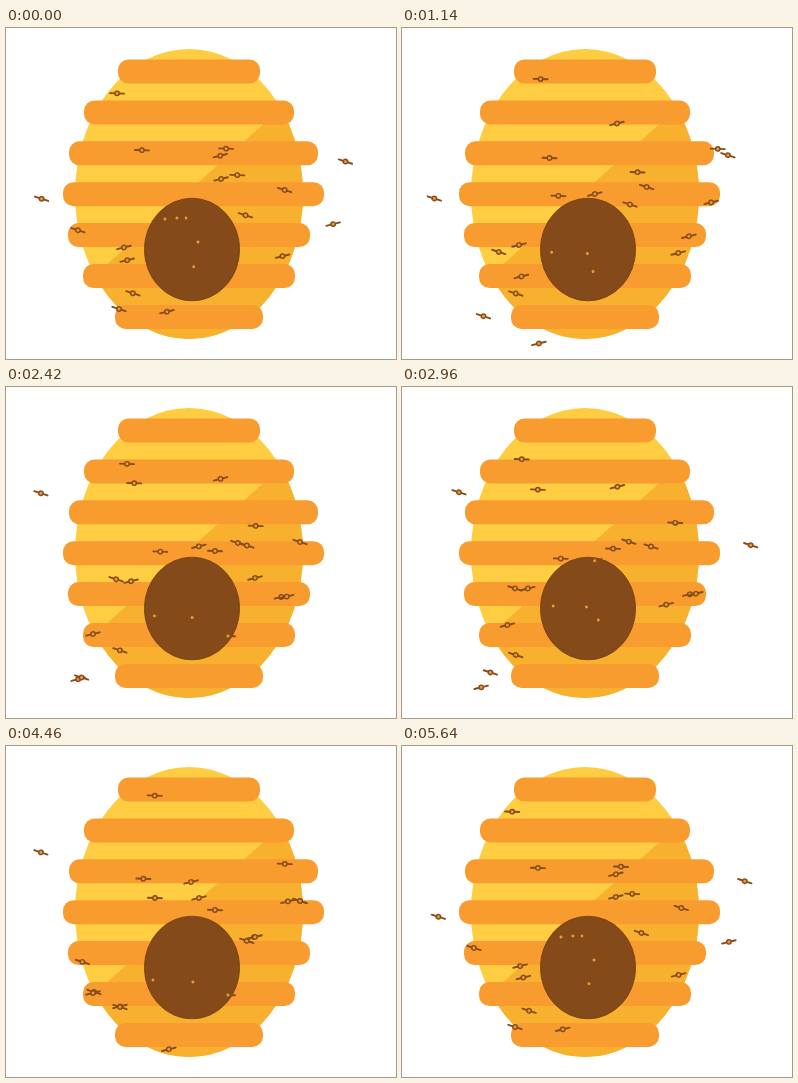
Recreate the animation shown at these times as an HTML page. Size 390 by 331 pixels, loop 5660 ms.

```html
<!DOCTYPE html>
<html lang="en">
<head>
<meta charset="utf-8">
<title>Beehive</title>
<style>
  html, body { margin: 0; width: 100%; height: 100%; overflow: hidden; background: #fff; }
  svg { display: block; width: 100vw; height: 100vh; }
</style>
</head>
<body>
<svg viewBox="0 0 390 331">
  <defs>
    <clipPath id="dome"><ellipse cx="183" cy="166" rx="114" ry="145"/></clipPath>
    <g id="bee">
      <path d="M-7 0H7" stroke="#864b18" stroke-width="1.9" stroke-linecap="round"/>
      <circle r="2.2" fill="#e59a3c" stroke="#864b18" stroke-width="1.4"/>
    </g>
  </defs>
  <g clip-path="url(#dome)">
    <path d="M0 0H390V331H0Z" fill="#ffcd42"/>
    <path d="M282 74L60 273V331H390V74Z" fill="#f8b02f"/>
  </g>
  <g id="bands" fill="#f89c30"></g>
  <ellipse cx="186" cy="221.5" rx="47.6" ry="51.3" fill="#844a1a" stroke="#77410f" stroke-width=".8"/>
  <g id="bees"></g>
</svg>
<script>
const NS = 'http://www.w3.org/2000/svg';
const LOOP = 5660;
const LEG = 880;
const TILTS = [-14, 2, 18];

function add(parent, tag, attributes) {
  const node = document.createElementNS(NS, tag);
  for (const key in attributes) node.setAttribute(key, attributes[key]);
  return document.getElementById(parent).appendChild(node);
}

// Left and right edge of each band, top to bottom.
[[112, 254], [78, 288], [63, 312], [57, 318], [62, 304], [77, 289], [109, 257]]
  .forEach(([left, right], row) => add('bands', 'rect', {
    x: left, y: 31.5 + row * 40.9, width: right - left, height: 24, rx: 10.5
  }));

// Each bee flies its waypoints out and back; a flock shares its turning time.
const flocks = [
  { turn: 2550, lag: 80, routes: [
    [72, 292, 107, 320, 161, 305, 160, 282],
    [249, 139, 330, 126, 284, 118, 215, 121],
    [232, 156, 217, 157, 240, 194, 239, 186],
    [275, 210, 317, 194, 287, 157, 209, 151],
    [121, 77, 121, 58, 150, 49, 107, 67],
    [110, 192, 115, 225, 78, 217, 72, 201],
    [125, 194, 126, 227, 114, 261, 122, 229],
    [128, 96, 154, 122, 138, 133, 136, 121]
  ] },
  { turn: 4570, lag: 200, routes: [
    [185, 136, 214, 128, 214, 88],
    [147, 234, 159, 191],
    [294, 155, 279, 162, 237, 158],
    [248, 191, 327, 196, 274, 211],
    [187, 236, 180, 190],
    [88, 246, 127, 265, 69, 293],
    [193, 152, 192, 214],
    [149, 152, 171, 190, 152, 161],
    [114, 261, 113, 281]
  ] },
  { turn: 610, lag: 60, routes: [
    [112, 208, 118, 229, 87, 247],
    [206, 263, 181, 226, 222, 249],
    [269, 102, 375, 154, 294, 155],
    [274, 211, 275, 234, 249, 191],
    [252, 133, 217, 157, 209, 164],
    [19, 167, 45, 166, 35, 106, 67, 109]
  ] }
];

const bees = flocks.flatMap(({ turn, lag, routes }) => routes.map((route, i) => ({
  turn, lag, route, tilt: TILTS[i % 3], node: add('bees', 'use', { href: '#bee' })
})));

function waypoint(route, index, axis) {
  const last = route.length / 2 - 1;
  const step = Math.abs(index) % (2 * last);
  return route[2 * Math.min(step, 2 * last - step) + axis];
}

function along(route, u, axis) {
  const i = Math.floor(u), f = u - i;
  const [a, b, c, d] = [-1, 0, 1, 2].map(k => waypoint(route, i + k, axis));
  return b + f / 2 * (c - a + f * (2 * a - 5 * b + 4 * c - d + f * (3 * (b - c) + d - a)));
}

function render(time) {
  for (const { turn, lag, route, tilt, node } of bees) {
    const since = (time - turn + LOOP) % LOOP;
    const age = Math.min(since, LOOP - since);
    const u = Math.max(0, Math.min(3, (age - lag) / LEG));
    const x = along(route, u, 0).toFixed(2), y = along(route, u, 1).toFixed(2);
    node.setAttribute('transform', `translate(${x} ${y}) rotate(${tilt})`);
  }
}

const start = performance.now();
function tick() {
  render((performance.now() - start) % LOOP);
  requestAnimationFrame(tick);
}
tick();
</script>
</body>
</html>
```
